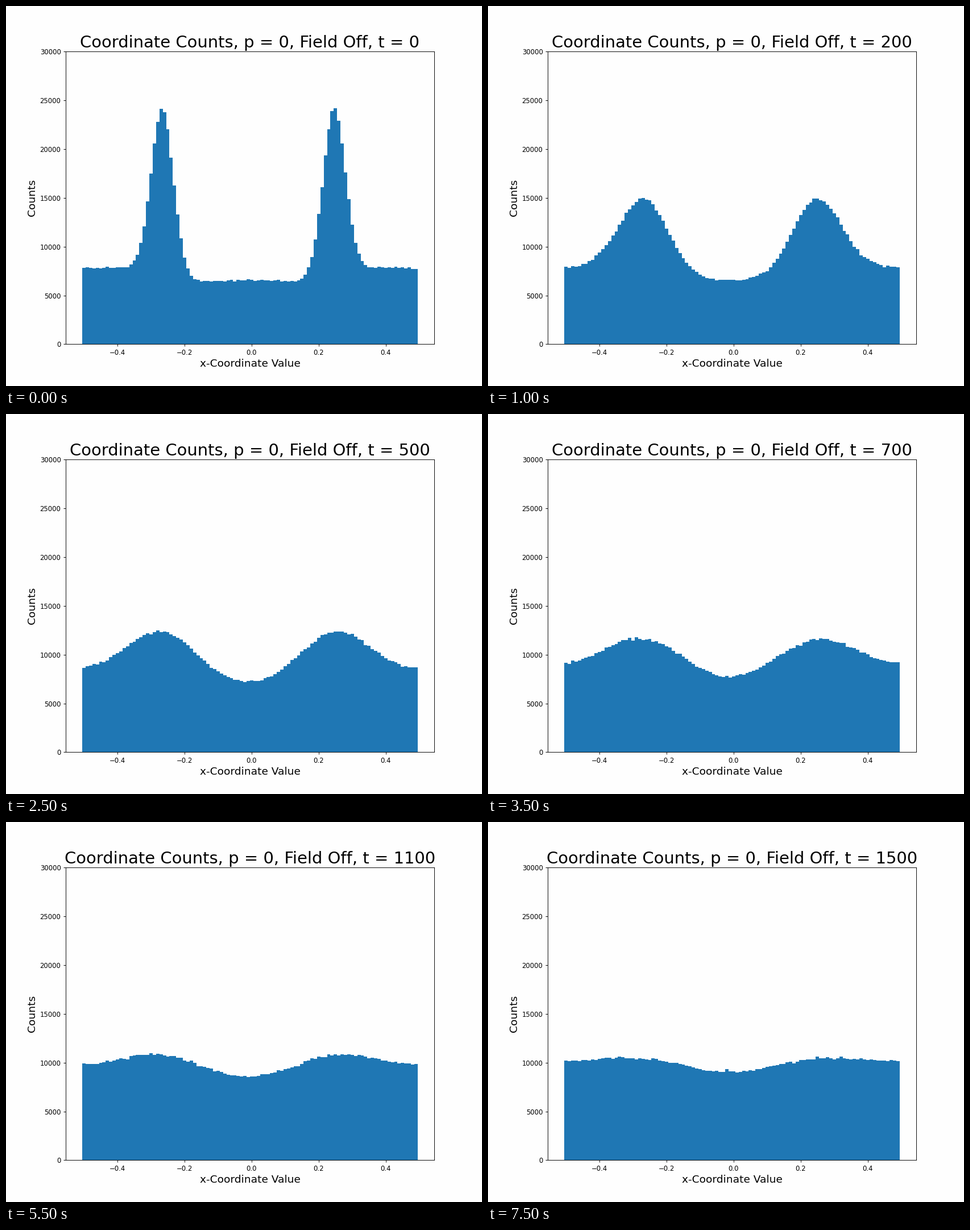
Write a matplotlib script that moves like this. It is 837 px wide and 669 px high and loops after 8000 ms.

```python
import numpy as np
import matplotlib.pyplot as plt
from matplotlib.animation import FuncAnimation

WIDTH, HEIGHT, DPI = 837, 669, 83.7
FRAMES, INTERVAL, STEP = 16, 500, 100
BINS = 100
LEFT, RIGHT = 23.5, 74.5   # peak centres, in bins
SPREAD = 0.216             # variance growth in bins^2 per time unit

bins = np.arange(BINS)
x = -0.5 + bins / BINS


def bell(centre, sigma):
    return np.exp(-0.5 * ((bins - centre) / sigma) ** 2)


def start_profile():
    inside = (np.tanh((bins - LEFT) / 2) - np.tanh((bins - RIGHT) / 2)) / 2
    peaks = bell(LEFT, 3.35) + bell(RIGHT, 3.35)
    return 7850 - 1450 * inside + 17000 * peaks + 170 * bell(49, 8)


spectrum = np.fft.rfft(start_profile())
waves = 2 * np.pi * np.arange(len(spectrum)) / BINS


def counts(t):
    """Periodic diffusion of the start profile, with counting noise."""
    mean = np.fft.irfft(spectrum * np.exp(-0.5 * waves**2 * SPREAD * t), BINS)
    noise = np.random.default_rng(t + 7).normal(0, 0.75, BINS)
    return mean + noise * np.sqrt(mean)


# The small excess keeps the pixel size from rounding down.
fig, ax = plt.subplots(
    figsize=((WIDTH + 0.01) / DPI, (HEIGHT + 0.01) / DPI),
    dpi=DPI, facecolor="#fefefe")
ax.set_facecolor("#fefefe")
bars = ax.bar(x, counts(0), width=1 / BINS, color="#1f77b4")
ax.set_xlim(-0.555, 0.545)
ax.set_ylim(0, 30000)
ax.set_xlabel("x-Coordinate Value", fontsize=16)
ax.set_ylabel("Counts", fontsize=16)
title = ax.set_title("", fontsize=25)


def update(frame):
    t = frame * STEP
    for bar, height in zip(bars, counts(t)):
        bar.set_height(height)
    title.set_text(f"Coordinate Counts, p = 0, Field Off, t = {t}")
    return [*bars, title]


anim = FuncAnimation(fig, update, frames=FRAMES, interval=INTERVAL,
                     repeat=True, repeat_delay=0, blit=False)
plt.show()
```
